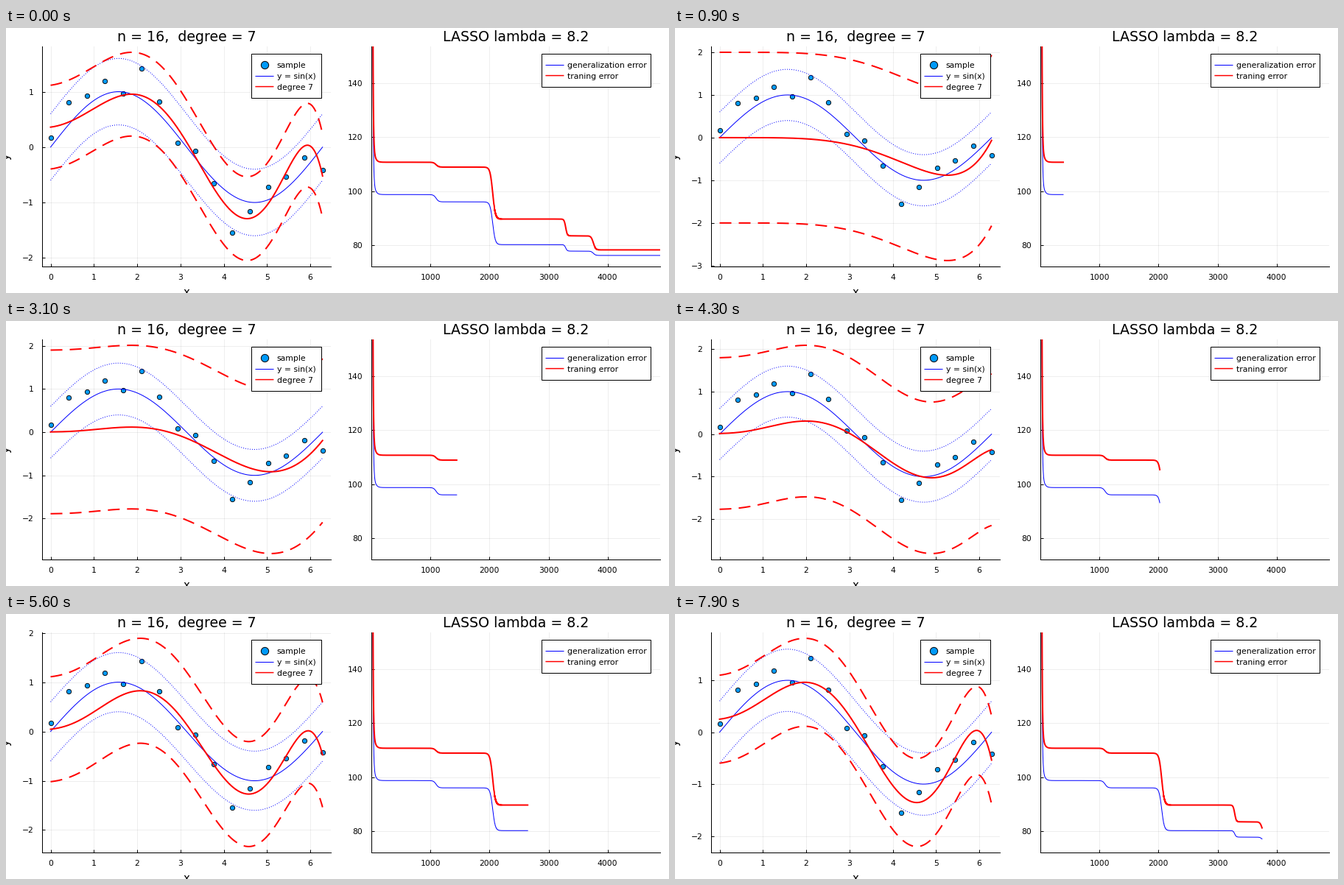
A matplotlib script for the animation above (8000 ms loop, 900 px wide and 360 px high).

```python
import numpy as np
import matplotlib.pyplot as plt
from matplotlib.animation import FuncAnimation
from matplotlib.ticker import MultipleLocator

W, H, DPI = 900, 360, 100
PT = 72 / DPI                      # points per pixel
FRAMES, STEP, LAST = 80, 48.1, 4890
BLUE, RED, DOT = "#0000ff", "#ff0000", "#009afa"
TAU = 2 * np.pi

plt.rcParams["font.family"] = "DejaVu Sans"

x = np.linspace(0, TAU, 400)
sample_x = np.linspace(0, TAU, 16)
sample_y = [0.166, 0.81, 0.93, 1.187, 0.965, 1.42, 0.822, 0.08,
            -0.068, -0.658, -1.547, -1.156, -0.717, -0.537, -0.185, -0.418]


def mix(a, b, t):
    return a + (b - a) * t


def fit(start, extrema, end, slope=0.1):
    """Polynomial on x from its start, its turning points and its end."""
    p = np.arange(min(8, 3 + 2 * len(extrema)))

    def value(at):
        return (at / TAU) ** p

    def deriv(at):
        return 0.3 * p * (at / TAU) ** np.maximum(p - 1, 0) / TAU

    rows = [value(0.0), deriv(0.0), value(TAU)]
    goal = [start, 0.3 * slope, end]
    for at, y in extrema:
        rows += [value(at), deriv(at)]
        goal += [y, 0]
    coef = np.linalg.lstsq(np.array(rows), np.array(goal), rcond=None)[0]
    return (x[:, None] / TAU) ** p @ coef


flat = -0.86 * x ** 5 * (6.315 - x) / 4248
bump = fit(0.015, [(2.0, 0.307), (4.9, -1.026)], -0.365, slope=0.03)
wave = fit(0.045, [(2.06, 0.825), (4.6, -1.274), (5.94, 0.01)], -0.465)
late = fit(0.25, [(1.97, 0.962), (4.55, -1.355), (5.94, 0.035)], -0.54)
final = fit(0.36, [(1.87, 0.955), (4.545, -1.293), (5.93, 0.033)], -0.52)

# The fitted curve passes through these poses at these iterations
POSES = {
    0: 1.04 * flat,
    1010: flat,
    1140: mix(flat, bump, 0.38),
    1900: mix(flat, bump, 0.5),
    2021: bump,
    2130: wave,
    3270: wave,
    3345: mix(wave, late, 0.5),
    3752: late,
    3850: final,
}
times, curves = list(POSES), np.array(list(POSES.values()))


def curve(it):
    return np.array([np.interp(it, times, row) for row in np.eye(len(times))]) @ curves


# centre, duration, fall of training error, fall of generalization error
DROPS = [(1095, 22, 1.8, 2.7), (2054, 22, 19.2, 15.8),
         (3290, 13, 6.2, 2.4), (3758, 19, 5.2, 1.6)]
PLATEAU = 110.75


def error(it, base, column, ring):
    """A steep start, then plateaus joined by sigmoid drops that ring briefly."""
    d = it - 26
    y = base + 46 * np.exp(-d / 7) + 8 * np.exp(-d / 28)
    for drop in DROPS:
        u = (it - drop[0]) / drop[1]
        y = y - drop[column] / (1 + np.exp(-u))
        y = y + ring * drop[column] * (u > 1) * np.exp(-np.abs(u) / 2) * np.sin(12 * u)
    return y


def train(it):
    return error(it, PLATEAU, 2, 0.06)


def general(it):
    return error(it, 98.8, 3, 0.02)


def half_width(it):
    return 2 * np.exp((min(train(max(it - 14, 26)), PLATEAU) - PLATEAU) / 33.3)


fig = plt.figure(figsize=(W / DPI, H / DPI), dpi=DPI, facecolor="white")


def panel(left, right, top=24.5, bottom=324.4):
    ax = fig.add_axes([left / W, 1 - bottom / H, (right - left) / W, (bottom - top) / H])
    ax.set_axisbelow(True)
    ax.grid(color="black", alpha=0.065, lw=PT)
    ax.spines[["top", "right"]].set_visible(False)
    ax.spines[["left", "bottom"]].set_linewidth(PT)
    ax.tick_params(direction="in", length=4 * PT, width=PT, labelsize=7.75)
    ax.tick_params(axis="x", pad=9.4 * PT)
    ax.tick_params(axis="y", pad=12 * PT)
    return ax


ax1, ax2 = panel(49.45, 440.8), panel(496.45, 888)
pad = 0.03 * TAU
ax1.set_xlim(-pad, TAU + pad)
ax1.xaxis.set_major_locator(MultipleLocator(1))
ax1.yaxis.set_major_locator(MultipleLocator(1))
ax2.set_xlim(5, LAST)
ax2.set_ylim(72.1, 153.7)
ax2.xaxis.set_major_locator(MultipleLocator(1000))
ax2.yaxis.set_major_locator(MultipleLocator(20))

thin = dict(color=BLUE, lw=PT)
thick = dict(color=RED, lw=2 * PT)
dotted = dict(thin, dashes=(1, 2), dash_capstyle="butt")
dashed = dict(thick, dashes=(8, 5), dash_capstyle="butt")
marker = dict(ls="none", marker="o", mfc=DOT, mec="black")

ax1.plot(sample_x, sample_y, ms=6.3 * PT, mew=0.9 * PT, zorder=2, **marker)
ax1.plot(x, np.sin(x), zorder=3, **thin)
for shift in (-0.6, 0.6):
    ax1.plot(x, np.sin(x) + shift, zorder=3, **dotted)
fit_line, = ax1.plot([], [], zorder=4, **thick)
low_line, = ax1.plot([], [], zorder=4, **dashed)
high_line, = ax1.plot([], [], zorder=4, **dashed)
general_line, = ax2.plot([], [], zorder=3, **thin)
train_line, = ax2.plot([], [], zorder=4, **thick)

# Titles, labels and legends in pixel coordinates
top = fig.add_axes([0, 0, 1, 1], zorder=5)
top.set_xlim(0, W)
top.set_ylim(H, 0)
top.axis("off")


def label(px, py, text, size, ha="center", **kw):
    top.text(px, py, text, fontsize=size, ha=ha, va="baseline", **kw)


def legend(left, right, keys):
    height = 15 * (len(keys) + 1)
    top.add_patch(plt.Rectangle((left, 34.8), right - left, height,
                                fc="white", ec="black", lw=PT))
    for i, (text, style) in enumerate(keys):
        y = 49.6 + 15 * i
        if style is marker:
            top.plot([left + 17.7], [y], ms=10.3 * PT, mew=PT, **marker)
        else:
            slim = dict(style, lw=min(style["lw"], 1.5 * PT))
            top.plot([left + 5, left + 30], [y, y], solid_capstyle="butt",
                     snap=style is thin, **slim)
        label(left + 34.5, y + 4, text, 7.8, ha="left")


label(245.4, 17.5, "n = 16,  degree = 7", 13.68)
label(692.3, 17.5, "LASSO lambda = 8.2", 13.68)
label(245.4, 364, "x", 10.7)
label(5, 174.5, "y", 10.7, rotation=90, rotation_mode="anchor")
legend(333.4, 428.4, [("sample", marker), ("y = sin(x)", thin), ("degree 7", thick)])
legend(727.4, 875.4, [("generalization error", thin), ("traning error", thick)])


def update(k):
    it = LAST if k == 0 else 1 + STEP * (k - 1)
    y, half = curve(it), half_width(it)
    fit_line.set_data(x, y)
    low_line.set_data(x, y - half)
    high_line.set_data(x, y + half)
    lo, hi = min(-1.6, (y - half).min()), max(1.6, (y + half).max())
    margin = 0.03 * (hi - lo)
    ax1.set_ylim(lo - margin, hi + margin)

    its = np.append(np.arange(26, it, 4), it) if it > 26 else np.array([])
    general_line.set_data(its, general(its))
    train_line.set_data(its, train(its))
    return fit_line, low_line, high_line, general_line, train_line


anim = FuncAnimation(fig, update, frames=FRAMES, interval=100, repeat=True, repeat_delay=0)
plt.show()
```
